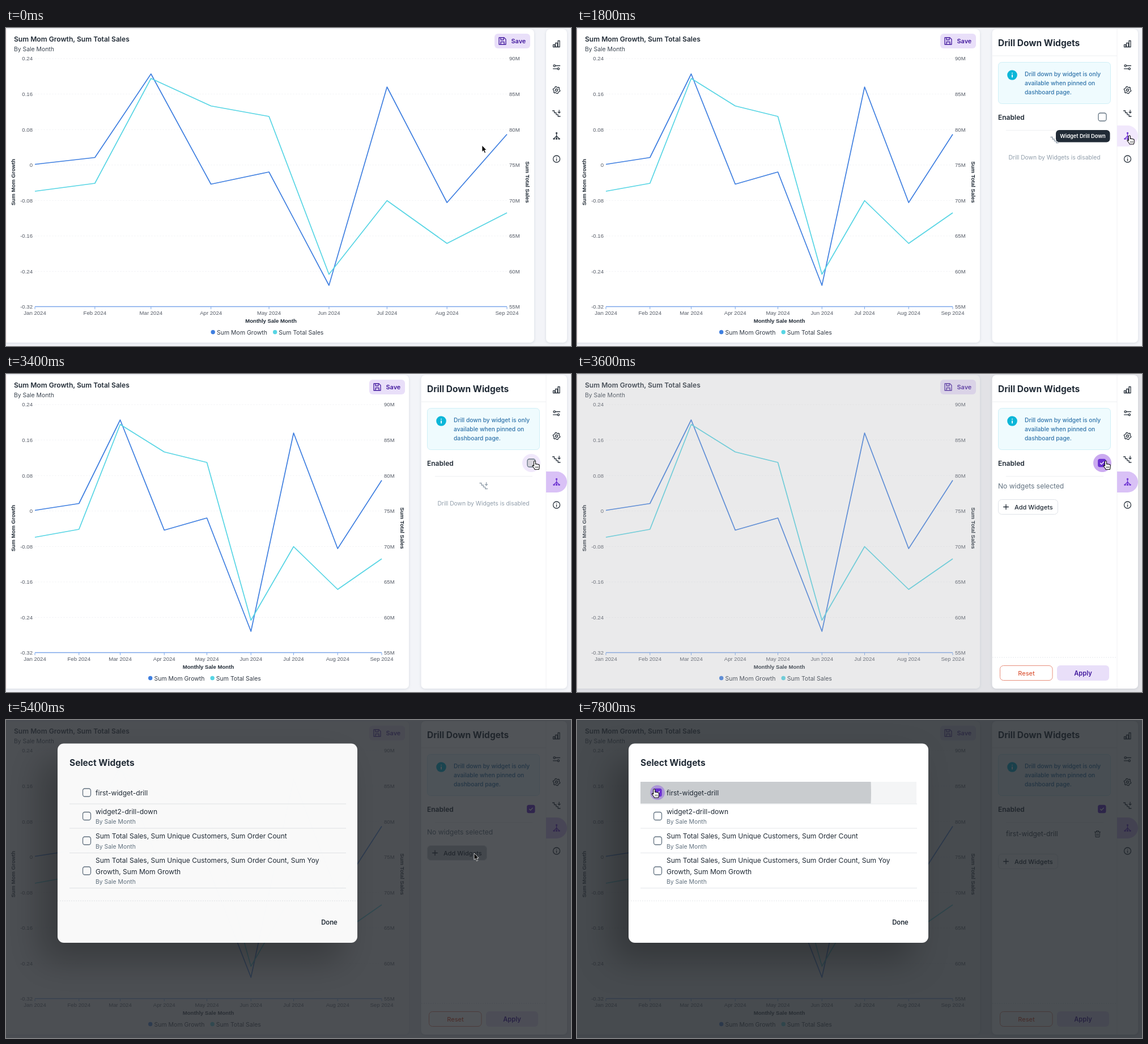
Write an HTML page that moves like this. It is 997x561 px and loops after 8000 ms.

```html
<!DOCTYPE html>
<html lang="en">
<head>
<meta charset="utf-8">
<title>Drill down widgets</title>
<style>
html, body { margin: 0; height: 100%; overflow: hidden; background: #f3f4f8; }
svg { display: block; width: 100vw; height: 100vh; font-family: Inter, "Open Sans", sans-serif; }
.axis { font-family: "Liberation Sans", Arial, sans-serif; }
.icon { fill: none; stroke-width: 1.3; stroke-linecap: round; stroke-linejoin: round; }
.card { filter: drop-shadow(0 1px 2px rgba(145,158,171,.3)); }
.modal { filter: drop-shadow(-28px 30px 30px rgba(0,0,0,.28)); }
</style>
</head>
<body>
<svg id="stage" viewBox="0 0 997 561"></svg>
<script>
const LOOP = 8000, STEP = 200;
const INK = '#212b36', GREY = '#637381', PALE = '#919eab', PURPLE = '#6a2fd0', DEEP = '#431a9e';
const BLUE = '#3f7fe0', CYAN = '#57d5e4', BACKDROP = '#1f2429';
const MONTHS = ['Jan', 'Feb', 'Mar', 'Apr', 'May', 'Jun', 'Jul', 'Aug', 'Sep'];
const DAYS = [0, 31, 60, 91, 121, 152, 182, 213, 244];
const GROWTH = [240.5, 228.5, 81, 275.5, 254, 454, 104, 308, 187.5];
const SALES = [288, 274, 89, 137.5, 156, 434.5, 304.5, 380, 326];

// Pointer stops: time, x, y
const STOPS = [[0, 840, 207], [800, 975, 190], [2400, 975, 190], [3200, 933, 153.5], [3600, 933, 153.5],
  [4800, 825, 237], [5200, 825, 237], [5400, 826, 235], [6000, 826, 235], [7200, 139, 124], [7400, 136.3, 122]];

const txt = (x, y, size, fill, s, weight = 400, extra = '') =>
  `<text x="${x}" y="${y}" font-size="${size}" fill="${fill}" font-weight="${weight}" ${extra}>${s}</text>`;
const rect = (x, y, w, h, r, fill, extra = '') =>
  `<rect x="${x}" y="${y}" width="${w}" height="${h}" rx="${r}" fill="${fill}" ${extra}/>`;
const circle = (x, y, r, fill, extra = '') => `<circle cx="${x}" cy="${y}" r="${r}" fill="${fill}" ${extra}/>`;
const line = (x1, y1, x2, y2, color, extra = '') =>
  `<path d="M${x1} ${y1}L${x2} ${y2}" stroke="${color}" ${extra}/>`;
const icon = (x, y, d, color, extra = '') =>
  `<path class="icon" transform="translate(${x} ${y})" d="${d}" stroke="${color}" ${extra}/>`;
const MID = 'text-anchor="middle"';

const STAIRS = 'M-7-4.5H-4V-1H-.7V2.3H2.6V5.5H6.5M4.6-5.5V-.4M2.6-2.4L4.6-.4L6.6-2.4';
const TREE = 'M0-3V1M0 0L-4 4M0 0L4 4M0 0V4M-1-5a1 1 0 1 0 2 0a1 1 0 1 0-2 0' +
  'M-5.5 4.5h2v1h-2zM-1 4.5h2v1h-2zM3.5 4.5h2v1h-2z';
const gear = () => {
  const pts = [];
  for (let i = 0; i < 24; i++) {
    const a = (i + .5) * Math.PI / 12, r = i % 4 < 2 ? 6.3 : 4.9;
    pts.push((r * Math.cos(a)).toFixed(1) + ' ' + (r * Math.sin(a)).toFixed(1));
  }
  return 'M' + pts.join('L') + 'ZM-2 0a2 2 0 1 0 4 0a2 2 0 1 0-4 0';
};
const ICONS = [
  'M-6 5.5V1.5h3v4M-2 5.5V-1.5h3.5v7M2.5 5.5V-5.5h3v11M-6 5.5H5.5',
  'M-5.5-2.5a1.7 1.7 0 1 0 3.4 0a1.7 1.7 0 1 0-3.4 0M-2-2.5H6M1.6 2.8a1.7 1.7 0 1 0 3.4 0a1.7 1.7 0 1 0-3.4 0M-6 2.8H1.5',
  gear(), STAIRS, TREE,
  'M-6 0a6 6 0 1 0 12 0a6 6 0 1 0-12 0M0-.3V3M0-2.8v.1'];

function pointer(t) {
  let i = STOPS.length - 1;
  while (STOPS[i][0] > t) i--;
  const a = STOPS[i], b = STOPS[i + 1] || a;
  const p = b === a ? 0 : (t - a[0]) / (b[0] - a[0]), e = p * p * (3 - 2 * p);
  return [a[1] + (b[1] - a[1]) * e, a[2] + (b[2] - a[2]) * e];
}

function checkbox(x, y, on, fill = 'none') {
  return on
    ? rect(x - 7.2, y - 7.2, 14.4, 14.4, 3.5, PURPLE) + icon(x, y, 'M-2.8 .2L-.8 2.2L3-1.8', '#fff')
    : rect(x - 7, y - 7, 14, 14, 3.5, fill, `stroke="${GREY}" stroke-width="1.3"`);
}

function chart(right) {
  const xs = DAYS.map(d => 51 + (right - 51) * d / 244), mid = (51 + right) / 2;
  const curve = (ys, color) => `<polyline points="${ys.map((y, i) => xs[i] + ',' + y).join(' ')}" fill="none" stroke="${color}" stroke-width="1.7" stroke-linejoin="round"/>`;
  let s = rect(-8, 2, right + 56, 553, 7, '#fff', 'class="card"') +
    line(.5, 2, .5, 555, '#fbe9e9') +
    txt(14, 23.5, 12.1, INK, 'Sum Mom Growth, Sum Total Sales', 600) +
    txt(14, 41, 10.4, '#3b4550', 'By Sale Month') +
    rect(right - 22, 10, 63, 26, 6, '#e9dff9') +
    icon(right - 8, 23, 'M-6-6H3L6-3V6H-6ZM-3-6V-2H2V-6M-3 6V1.5H3V6', DEEP) +
    txt(right + 7.5, 27, 10.9, DEEP, 'Save', 600) + '<g class="axis">';
  for (let i = 0; i < 8; i++) {
    const y = 54 + i * 62.57;
    if (i < 7) s += line(51, y, right, y, '#f4f5f7', 'stroke-dasharray="3 2"');
    s += txt(47, y + 3.4, 9.6, '#555b66', +(.24 - i * .08).toFixed(2), 400, 'text-anchor="end"') +
      txt(right + 4, y + 3.4, 9.6, '#555b66', 90 - i * 5 + 'M');
  }
  s += line(51, 491.5, right, 491.5, '#7ba6ea', 'stroke-width="1.5"');
  xs.forEach((x, i) => s += line(x, 492, x, 496, '#7ba6ea') +
    txt(x, 505.5, 9.6, '#555b66', MONTHS[i] + ' 2024', 400, MID));
  s += txt(mid, 520, 9.6, INK, 'Monthly Sale Month', 700, MID) +
    txt(0, 0, 9.6, INK, 'Sum Mom Growth', 700, MID + ' transform="translate(16 272) rotate(-90)"') +
    txt(0, 0, 9.6, INK, 'Sum Total Sales', 700, MID + ` transform="translate(${right + 32.5} 272) rotate(90)"`) +
    '</g>' + curve(GROWTH, BLUE) + curve(SALES, CYAN);
  return s + circle(mid - 102.3, 536.5, 3.7, BLUE) + txt(mid - 95.5, 540.5, 10.5, '#333b46', 'Sum Mom Growth') +
    circle(mid + 7.2, 536.5, 3.7, CYAN) + txt(mid + 13.8, 540.5, 10.5, '#333b46', 'Sum Total Sales');
}

function enabledPanel(t) {
  const picked = t >= 7800, dy = picked ? 15 : 0, pressed = t >= 5000 && t < 5400;
  const fill = pressed ? '#e9ebee' : t >= 5400 && t < 5800 ? '#c2c5ca' : t >= 4800 && t < 5400 ? '#f4f5f6' : '#fff';
  return (picked
    ? txt(757, 205, 12, '#3b4550', 'first-widget-drill') +
      icon(918.5, 201, 'M-5-3.5H5M-2-3.5V-5.5H2V-3.5M-4-3.5L-3.4 5.5H3.4L4-3.5M-1.2-.5V3M1.2-.5V3', INK, 'style="stroke-width:1"')
    : txt(743, 202, 12.05, GREY, 'No widgets selected')) +
    rect(743.5, 221.5 + dy, 105, 26, 6, fill, pressed ? `stroke="${INK}" stroke-width="1.5"` : 'stroke="#dfe3e8"') +
    (pressed ? circle(826, 236, 8, '#d3d7db') : '') +
    icon(757, 234.5 + dy, 'M-4.3 0H4.3M0-4.3V4.3', INK) +
    txt(772, 238.5 + dy, 11, INK, 'Add Widgets', 500) +
    line(733, 500, 953, 500, '#e6e9ec', 'stroke-dasharray="2 2"') +
    rect(746.5, 514.5, 92.5, 26, 6, '#fff', 'stroke="#e8907d"') +
    txt(793, 531.5, 11, '#dc5a3c', 'Reset', 500, MID) +
    rect(847, 514, 92, 27, 6, '#e9dff9') + txt(893, 531.5, 11.1, DEEP, 'Apply', 600, MID);
}

function panel(t) {
  const on = t >= 3600;
  let s = rect(732.5, 2, 257.5, 553, 7, '#fff', 'class="card"') +
    line(953, 2, 953, 555, '#f1f2f4') + line(733, 49, 953, 49, '#eceef1') +
    txt(743, 31.5, 15.5, INK, 'Drill Down Widgets', 700) +
    rect(743.5, 60.5, 198, 73, 6, '#effbfe', 'stroke="#cfeff7"') +
    circle(768, 83, 8.8, '#0bb6d8') + icon(768, 83, 'M0-.2V3.4M0-3.4v.1', '#fff', 'style="stroke-width:1.8"');
  ['Drill down by widget is only', 'available when pinned on', 'dashboard page.']
    .forEach((row, i) => s += txt(790, 85 + i * 16, 10.25, '#2e73aa', row, 500));
  s += txt(743, 161.5, 12, INK, 'Enabled', 600);
  if (t >= 3200 && t < 4000) s += circle(927, 157, 16, t === 3600 ? '#cbaaf0' : '#f0e8fb');
  s += checkbox(on ? 926.3 : 927, 157, on, t === 3400 ? '#d6d3dc' : 'none') + line(757, 180.5, 929, 180.5, '#eef0f2');
  return s + (on ? enabledPanel(t)
    : icon(843, 197, STAIRS, PALE) + txt(842.5, 231.5, 10.3, PALE, 'Drill Down by Widgets is disabled', 400, MID));
}

function rail(t) {
  const hover = t >= 800;
  let s = t < 1600 ? rect(953, 2, 37, 553, 7, '#fff', 'class="card"') : '';
  if (hover) s += `<path d="M953 172h18.5a18.5 18.5 0 0 1 0 37H953z" fill="${t < 2000 ? '#f1e8fc' : '#d9c1f6'}"/>`;
  ICONS.forEach((d, i) => s += icon(971.5, [28, 69, 109.5, 150.5, 190.5, 231][i], d, hover && i === 4 ? PURPLE : '#2d3640'));
  if (t >= 1200 && t < 2800)
    s += rect(845, 180, 95.5, 21.5, 6, INK) + txt(892.5, 194.2, 9.3, '#fff', 'Widget Drill Down', 600, MID);
  return s;
}

function modal(t) {
  const fade = t < 5600 ? .97 : 1, picked = t >= 7800;
  const ripple = t >= 7800 ? 379 : t >= 7600 ? 90 : 0;
  let s = rect(0, 0, 997, 561, 0, BACKDROP, `opacity="${.8 * fade}"`) +
    `<g opacity="${fade}">` + rect(91, 41.5, 529, 351.5, 11, '#fff', 'class="modal"') +
    txt(112, 80.5, 15.5, INK, 'Select Widgets', 700);
  if (t >= 7200) s += rect(112, 109, 487, 38.5, 0, '#f4f5f6') +
    `<clipPath id="row">${rect(112, 109, 487, 38.5, 0, '#000')}</clipPath>` +
    circle(140, 128, ripple, INK, 'opacity=".2" clip-path="url(#row)"');
  if (picked) s += circle(142, 128, 13, '#9a72dc', 'opacity=".6"');
  const item = (y, boxY, rows, end, sub) => {
    s += checkbox(142.5, boxY, picked && boxY === 128) + line(112, end, 600, end, '#e4e7ea');
    rows.forEach((r, i) => s += txt(158, y + i * 19.5, 12.05, INK, r));
    if (sub) s += txt(158, end - 7.7, 10.4, GREY, 'By Sale Month');
  };
  item(132.5, 128, ['first-widget-drill'], 148);
  item(166, 169.5, ['widget2-drill-down'], 191, true);
  item(209, 213, ['Sum Total Sales, Sum Unique Customers, Sum Order Count'], 234.5, true);
  item(252, 266, ['Sum Total Sales, Sum Unique Customers, Sum Order Count, Sum Yoy', 'Growth, Sum Mom Growth'], 296.5, true);
  return s + line(91, 319, 620, 319, '#e4e7ea', 'stroke-dasharray="2 2"') +
    txt(570.5, 360.5, 11.3, INK, 'Done', 600, MID) + '</g>';
}

function cursor(t) {
  const [x, y] = pointer(t);
  const hand = [[800, 2600], [3200, 3800], [4800, 5200], [7200, LOOP]].some(([a, b]) => t >= a && t <= b);
  return `<g transform="translate(${x} ${y})" stroke-linejoin="round">` + (hand
    ? '<path d="M-1.5 1.2a1.5 1.5 0 0 1 3 0V5.5q1.2-.8 2.4.3q1.3-.7 2.3.4q2-.3 2 1.6v3.2q0 1.5-1 4h-7q-.8-2.2-3.4-5q-1.6-2 0-2.4q.9 0 1.7 1.2z" fill="#fff" stroke="#111" stroke-width="1.1"/><path d="M1.7 9.5v3M3.7 9.5v3M5.7 9.5v3" stroke="#111" stroke-width=".7"/>'
    : '<path d="M0 0V11.5L2.6 9.2L4.5 13.6L6.5 12.7L4.7 8.5H8Z" fill="#000" stroke="#fff" stroke-width=".8"/>') + '</g>';
}

function draw(t) {
  stage.innerHTML = rect(0, 0, 997, 561, 0, '#f3f4f8') + chart(t < 1600 ? 884 : 663) +
    (t >= 3600 ? rect(0, 0, 997, 561, 0, '#b4b4b7', 'opacity=".28"') : '') +
    (t >= 1600 ? panel(t) : '') + rail(t) + (t >= 5400 ? modal(t) : '') + cursor(t);
}

const stage = document.getElementById('stage');
let shown = -1;
function tick() {
  const t = Math.floor(performance.now() % LOOP / STEP) * STEP;
  if (t !== shown) draw(shown = t);
  requestAnimationFrame(tick);
}
tick();
</script>
</body>
</html>
```
